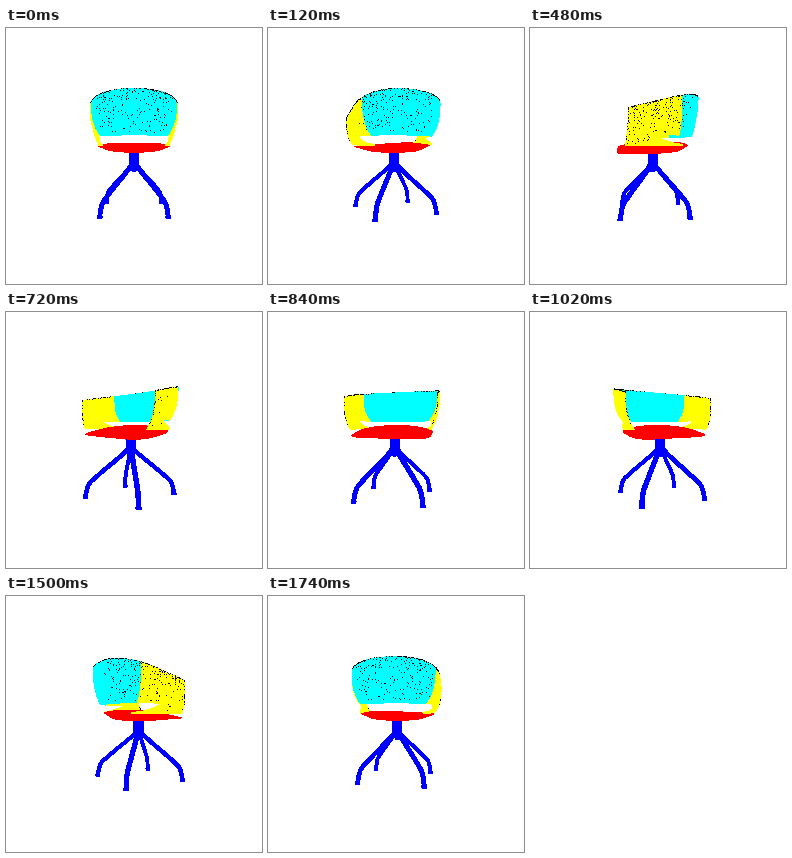
Write an HTML page with a canvas that moves like this. It is 256 by 256 pixels and loops after 1.8 s.

```html
<!DOCTYPE html>
<html lang="en">
<head>
<meta charset="utf-8">
<title>Turning chair</title>
<style>
html, body { margin: 0; width: 100%; height: 100%; overflow: hidden; background: #fff; }
canvas { display: block; width: 256px; height: 256px; image-rendering: pixelated; }
</style>
</head>
<body>
<canvas id="stage" width="256" height="256"></canvas>
<script>
const ctx = document.getElementById('stage').getContext('2d', { willReadFrequently: true });
const STEPS = 30, STEP_MS = 60;
const CX = 128, HORIZON = 115, DIST = 280;
const CYAN = '#0ff', YELLOW = '#ff0', RED = '#f00', BLUE = '#00f', BLACK = '#000';
const PANEL = 0.75, TIP = 1.5, STRETCH = 0.0024, TILT = 0.12;
let sin = 0, cos = 1;

function randomizer(seed) {
  return () => {
    seed = (seed * 1664525 + 1013904223) >>> 0;
    return seed / 4294967296;
  };
}
const rand = randomizer(7);
const mix = (a, b, k) => a + (b - a) * k;
const clamp = x => Math.max(0, Math.min(1, x));

// u: sideways, b: towards the backrest, y: down from eye level.
function project(u, b, y, stretch = 0, tilt = 0) {
  const x = u * cos + b * sin;
  const z = b * cos - u * sin;
  const s = DIST / (DIST - z);
  return { x: CX + x * s, y: HORIZON + y * s * (1 + stretch * z) + tilt * z, z, s };
}

// Plan curve: rounded back for |q| < 1, straight arms beyond it.
function plan(q, width, back, tip, n) {
  const side = Math.sign(q), a = Math.abs(q);
  if (a >= 1) return [side * width, -tip * (a - 1) / (TIP - 1)];
  const t = a * Math.PI / 2;
  return [side * width * Math.sin(t) ** (2 / n), back * Math.cos(t) ** (2 / n)];
}
const lowerPlan = q => plan(q, 36, 33, 32, 2);

function shell(q, v) {
  const low = Math.sign(q) * TIP * (Math.abs(q) / TIP) ** 1.14;
  const [u0, b0] = plan(q, 43, 38.5, 29, 2.3);
  const [u1, b1] = lowerPlan(low);
  const top = -33.8 - 0.24 * b0;
  const bottom = mix(2, -6.5, clamp((b1 + 9) / 3));
  return project(mix(u0, u1, v ** 3), mix(b0, b1, v ** 1.6), mix(top, bottom, v), STRETCH);
}

function fill(points, color, seam = 0) {
  ctx.beginPath();
  points.forEach(p => ctx.lineTo(p.x, p.y));
  ctx.closePath();
  ctx.fillStyle = color;
  ctx.fill();
  if (seam) {
    ctx.lineWidth = seam;
    ctx.strokeStyle = color;
    ctx.stroke();
  }
}

function dot(p) {
  ctx.fillStyle = BLACK;
  ctx.fillRect(Math.floor(p.x), Math.floor(p.y), 1, 1);
}

function hull(points) {
  const sorted = points.slice().sort((a, b) => a.x - b.x || a.y - b.y);
  const half = list => {
    const out = [];
    for (const p of list) {
      while (out.length > 1) {
        const a = out[out.length - 2], b = out[out.length - 1];
        if ((b.x - a.x) * (p.y - a.y) - (b.y - a.y) * (p.x - a.x) > 0) break;
        out.pop();
      }
      out.push(p);
    }
    return out.slice(0, -1);
  };
  return [...half(sorted), ...half(sorted.reverse())];
}

function drawSeat() {
  const points = [];
  for (let i = 0; i < 72; i++) {
    const t = i * Math.PI / 36, c = Math.cos(t), d = Math.sin(t);
    const e = c < 0 ? 0.4 : 1;
    const u = 37 * Math.sign(d) * Math.abs(d) ** e;
    const b = 35 * Math.sign(c) * Math.abs(c) ** e - 5.5;
    points.push(project(u, b, 3.5 - 0.06 * b, 0, TILT));
    points.push(project(u * 0.75, b * 0.75, 6.5, 0, TILT));
  }
  fill(hull(points), RED);
}

const LEG = [[2, 21], [9, 28], [23, 39], [36, 50], [42.5, 56], [44, 67]];

function drawLeg(angle) {
  const at = ([r, y]) => project(r * Math.sin(angle), r * Math.cos(angle) - 5.3, y);
  const pts = LEG.map(at), end = pts[pts.length - 1];
  ctx.strokeStyle = BLUE;
  ctx.lineWidth = 4.5 * end.s;
  ctx.beginPath();
  ctx.moveTo(pts[0].x, pts[0].y);
  for (let i = 1; i < pts.length - 1; i++) {
    const p = pts[i], n = pts[i + 1], last = i === pts.length - 2;
    ctx.quadraticCurveTo(p.x, p.y, last ? n.x : (p.x + n.x) / 2, last ? n.y : (p.y + n.y) / 2);
  }
  ctx.stroke();
  ctx.fillStyle = BLUE;
  ctx.fillRect(end.x - 2.6 * end.s, end.y - 1, 5.2 * end.s, 3);
}

function drawBase() {
  const angles = [1, 3, 5, 7].map(k => k * Math.PI / 4);
  const depth = a => Math.cos(a) * cos - Math.sin(a) * sin;
  angles.sort((a, b) => depth(a) - depth(b)).forEach(drawLeg);
  const top = project(0, -5.3, 7), hub = project(0, -5.3, 23), low = project(0, -5.3, 29);
  const w = 5.2 * top.s;
  fill([
    { x: top.x - w, y: top.y }, { x: top.x + w, y: top.y },
    { x: hub.x + w, y: hub.y }, { x: low.x + 2, y: low.y },
    { x: low.x - 2, y: low.y }, { x: hub.x - w, y: hub.y }
  ], BLUE);
}

const cuts = [];
for (let i = 0; i <= 14; i++) cuts.push(mix(-TIP, -PANEL, i / 14));
for (let i = 1; i <= 24; i++) cuts.push(mix(-PANEL, PANEL, i / 24));
for (let i = 1; i <= 14; i++) cuts.push(mix(PANEL, TIP, i / 14));
const ROWS = [0, 0.2, 0.4, 0.6, 0.8, 0.9, 1];

const rim = [];
for (let q = -TIP; q <= TIP; q += 0.012) if (rand() < 0.5) rim.push([q, 0]);
for (let v = 0; v < 0.9; v += 0.03) {
  for (const q of [-TIP, TIP]) if (rand() < 0.4) rim.push([q, v]);
}
const specks = Array.from({ length: 540 }, () => ({
  q: mix(-TIP, TIP, rand()),
  v: rand() ** 1.5 * 0.95,
  limit: mix(0.55, 0.92, rand())
}));

// 1 where the outside of the shell looks straight at the viewer.
function facing(q, v) {
  const p = shell(q, v), a = shell(q + 0.02, v);
  return (a.x - p.x) / Math.hypot(a.x - p.x, a.z - p.z);
}

// Low yellow edge that joins an arm to the seat below the side opening.
function lip(side) {
  const upper = [], lower = [];
  for (let i = 0; i <= 12; i++) {
    const [u, b] = lowerPlan(side * mix(0.6, 1.14, i / 12));
    const rise = clamp((19 - b) / 27) ** 1.5;
    upper.push(project(u, b, 1 - 7 * rise, STRETCH));
    lower.push(project(u, b, 2, STRETCH));
  }
  return { z: upper[6].z, draw: () => fill(upper.concat(lower.reverse()), YELLOW, 0.7) };
}

function shellParts() {
  const parts = [lip(-1), lip(1)];
  for (let i = 1; i < cuts.length; i++) {
    const l = cuts[i - 1], r = cuts[i];
    const color = Math.abs(l + r) / 2 < PANEL ? CYAN : YELLOW;
    const edge = ROWS.map(v => shell(l, v)).concat(ROWS.map(v => shell(r, v)).reverse());
    const z = edge.reduce((sum, p) => sum + p.z, 0) / edge.length;
    parts.push({ z, draw: () => fill(edge, color, 0.7) });
  }
  for (const [q, v] of rim) {
    const p = shell(q, v);
    parts.push({ z: p.z + 1.5, draw: () => dot(p) });
  }
  return parts;
}

// Keep every pixel a pure colour with hard edges.
function harden() {
  const image = ctx.getImageData(0, 0, 256, 256), d = image.data;
  for (let i = 0; i < d.length; i++) d[i] = d[i] > 127 ? 255 : 0;
  ctx.putImageData(image, 0, 0);
}

function render(step) {
  const turn = step / STEPS * 2 * Math.PI;
  sin = Math.sin(turn);
  cos = Math.cos(turn);
  ctx.fillStyle = '#fff';
  ctx.fillRect(0, 0, 256, 256);
  drawBase();
  const parts = shellParts();
  parts.push({ z: 0, draw: drawSeat });
  parts.sort((a, b) => a.z - b.z).forEach(part => part.draw());
  for (const { q, v, limit } of specks) if (facing(q, v) > limit) dot(shell(q, v));
  harden();
}

const start = performance.now();
let shown = -1;
function tick() {
  const step = Math.floor((performance.now() - start) / STEP_MS) % STEPS;
  if (step !== shown) render(shown = step);
  requestAnimationFrame(tick);
}
tick();
</script>
</body>
</html>
```
